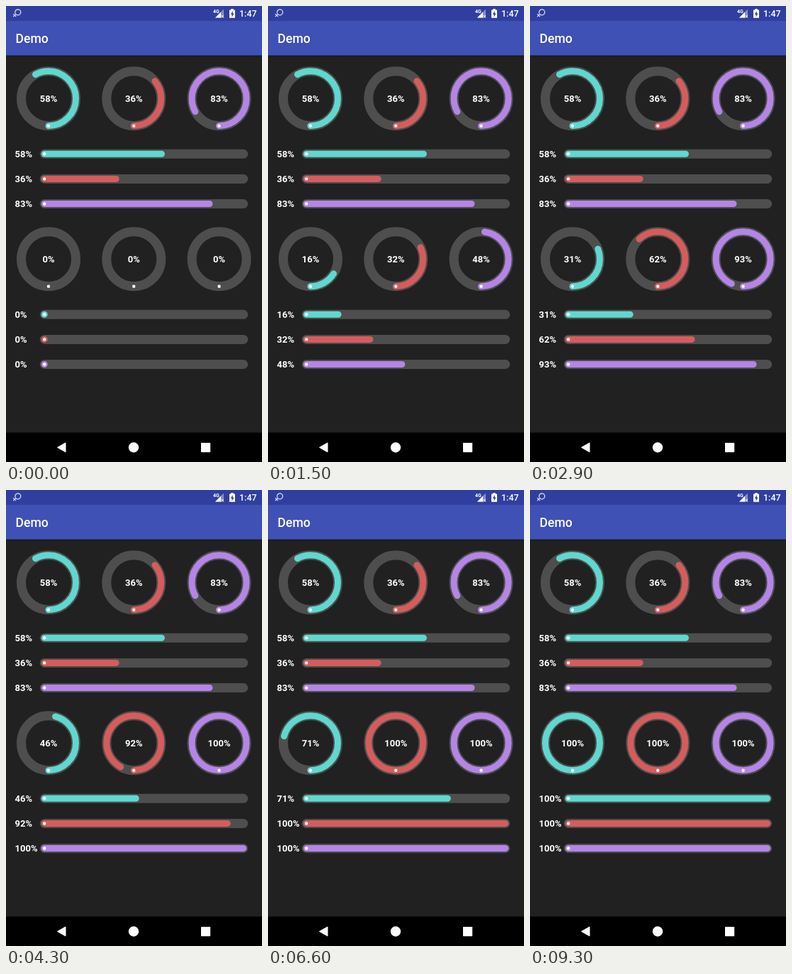
Write an HTML page that moves like this. It is 361 px wide and 642 px high and loops after 9700 ms.

```html
<!DOCTYPE html>
<html lang="en">
<head>
<meta charset="utf-8">
<title>Progress demo</title>
<style>
  html, body { margin: 0; width: 100%; height: 100%; overflow: hidden; background: #212121; }
  svg { display: block; width: 361px; height: 642px; font-family: Roboto, sans-serif; fill: #fff; }
  .ring, .bar { fill: none; stroke-linecap: round; stroke-width: 9; }
  .track { stroke: #4e4e4e; stroke-width: 13; }
  .label { font-size: 13px; font-weight: 700; }
  .center { text-anchor: middle; }
</style>
</head>
<body>
<svg viewBox="0 0 361 642">
  <defs>
    <linearGradient id="shade" x2="0" y2="1">
      <stop stop-opacity=".3"/>
      <stop offset="1" stop-opacity="0"/>
    </linearGradient>
  </defs>
  <rect width="361" height="642" fill="#212121"/>
  <rect y="69.5" width="361" height="3" fill="url(#shade)"/>
  <rect y="21" width="361" height="48.5" fill="#3f51b5"/>
  <rect width="361" height="21" fill="#303f9f"/>
  <text x="13.5" y="52" font-size="17.6" font-weight="500">Demo</text>

  <!-- status icons -->
  <g fill="none" stroke="#dfe2f2" stroke-width="1.2">
    <circle cx="16.8" cy="8.8" r="4"/>
    <path d="M10.2 11.2l4 4m0-4l-4 4"/>
  </g>
  <text x="292" y="9.6" font-size="7" font-weight="700">4G</text>
  <path d="M295 16.5L307 4.5V16.5Z" fill="#8790c6"/>
  <path d="M295 16.5L303 8.5V16.5Z"/>
  <path d="M303.6 12.8l3.6 3.6m0-3.6l-3.6 3.6" stroke="#fff"/>
  <path d="M315 5.4h2.3V4h3.4v1.4h2.3v11.4h-8Z"/>
  <path d="M319.8 7l-3 4.8h1.8v3.6l3-4.9h-1.8Z" fill="#303f9f"/>
  <text x="329" y="15" font-size="12.5" font-weight="500">1:47</text>

  <g id="widgets"></g>

  <!-- navigation bar -->
  <rect y="600.5" width="361" height="41.5" fill="#000"/>
  <path d="M72.5 621.5L84 615v13Z" stroke="#fff" stroke-linejoin="round"/>
  <circle cx="180" cy="621.5" r="7.2"/>
  <rect x="275" y="615" width="13.2" height="13.2" rx=".6"/>
</svg>
<script>
const COLORS = ['#5fd8cf', '#d65c5c', '#b485e6'];
const BAR_START = 54.2, BAR_END = 334.7, RADIUS = 38.5;
const LOOP = 9700, TICK = 100;
// [tick, percent] along the slowest counter, including its short stalls
const STEPS = [[0, 0], [15, 16], [22, 24], [23, 24], [29, 31], [43, 46], [54, 58], [61, 66],
  [62, 66], [71, 77], [72, 77], [77, 83], [82, 88], [83, 90], [84, 90], [93, 100]];
const root = document.getElementById('widgets');

function add(tag, attrs) {
  const el = document.createElementNS('http://www.w3.org/2000/svg', tag);
  for (const name in attrs) el.setAttribute(name, attrs[name]);
  return root.appendChild(el);
}

function makeRing(cx, cy, color) {
  const circle = { cx, cy, r: RADIUS };
  add('circle', { ...circle, class: 'ring track' });
  const arc = add('circle', {
    ...circle, class: 'ring', stroke: color, pathLength: 100,
    transform: `translate(${cx} ${cy}) rotate(90) scale(1 -1) translate(${-cx} ${-cy})`
  });
  add('circle', { cx, cy: cy + RADIUS, r: 2.2 });
  const label = add('text', { x: cx, y: cy + 4.9, class: 'label center' });
  return value => {
    arc.style.visibility = value ? 'visible' : 'hidden';
    arc.setAttribute('stroke-dasharray', `${value} 200`);
    label.textContent = value + '%';
  };
}

function makeBar(y, color) {
  const line = { x1: BAR_START, x2: BAR_END, y1: y, y2: y };
  add('line', { ...line, class: 'bar track' });
  const fill = add('line', { ...line, class: 'bar', stroke: color });
  add('circle', { cx: BAR_START, cy: y, r: 2.2 });
  const label = add('text', { x: 12.6, y: y + 4.9, class: 'label' });
  return (value, shown = value) => {
    fill.setAttribute('x2', BAR_START + (BAR_END - BAR_START) * value / 100);
    label.textContent = shown + '%';
  };
}

function makeGroup(top) {
  return COLORS.map((color, i) => ({
    ring: makeRing(60 + 120.3 * i, top, color),
    bar: makeBar(top + 78.1 + 35.1 * i, color)
  }));
}

function percentAt(tick) {
  const next = Math.max(1, STEPS.findIndex(([t]) => t >= tick));
  const [t0, v0] = STEPS[next - 1], [t1, v1] = STEPS[next];
  return Math.round(v0 + (v1 - v0) * (tick - t0) / (t1 - t0));
}

const fixed = makeGroup(130.2), moving = makeGroup(356.2);
[58, 36, 83].forEach((value, i) => {
  fixed[i].ring(value);
  fixed[i].bar(i ? value : 58.9, value);
});

const start = performance.now();
function draw(now) {
  const time = Math.max(0, now - start) % LOOP;
  const percent = percentAt(Math.min(93, Math.floor(time / TICK)));
  moving.forEach(({ ring, bar }, i) => {
    const value = Math.min(100, percent * (i + 1));
    ring(value);
    bar(value);
  });
  requestAnimationFrame(draw);
}
draw(start);
</script>
</body>
</html>
```
